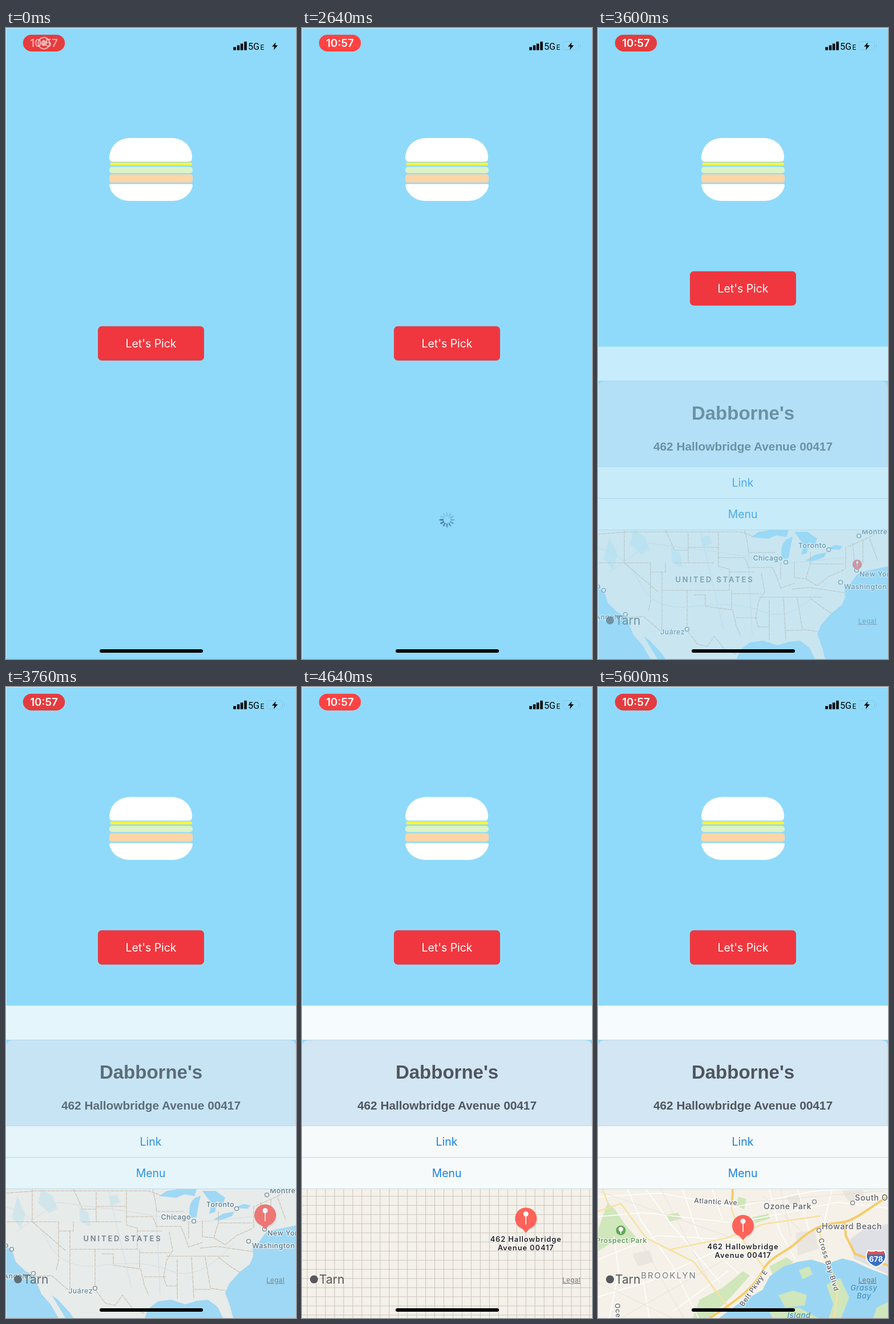
These frames come from a looping animation (508 by 1102 pixels, 5.68 s). An HTML page:

```html
<!DOCTYPE html>
<html lang="en">
<head>
<meta charset="utf-8">
<title>Let's Pick</title>
<style>
html, body { margin: 0; width: 100%; height: 100%; overflow: hidden; background: #8fdafa; }
svg { display: block; width: 100%; height: 100%; font-family: Inter, "Noto Sans", sans-serif; }
.mid { text-anchor: middle; }
.end { text-anchor: end; }
.head { font-family: "Liberation Sans", Arial, sans-serif; font-weight: 700; fill: #50565e; text-anchor: middle; }
.cell { font-family: Roboto, sans-serif; }
.link { fill: #1784df; font-size: 19.4px; text-anchor: middle; }
.label { font-size: 12.3px; font-weight: 500; letter-spacing: .55px; fill: #5d6167; }
.halo { paint-order: stroke; stroke: #fff; stroke-opacity: .8; stroke-width: 2.5px; stroke-linejoin: round; }
.line { fill: none; stroke-linejoin: round; stroke-linecap: round; }
.sea { fill: #a2d7f3; }
.bay { fill: #9ad6f4; }
.park { fill: #d0e6bb; }
</style>
</head>
<body>
<svg viewBox="0 0 508 1102">
  <defs><clipPath id="frame"><path d="M0 877H508V1102H0Z"/></clipPath></defs>
  <path fill="#8fdafa" d="M0 0H508V1102H0Z"/>

  <path fill="#fff" d="M187 233.5Q181 233.5 181 226C182 206 197 192 219 192H289C311 192 326 207 326 226Q326 233.5 320 233.5Z"/>
  <rect x="182.5" y="235" width="143.5" height="5" rx="2.5" fill="#f5f53e"/>
  <rect x="181" y="242.5" width="146" height="11" rx="5" fill="#dcf3c5"/>
  <rect x="181" y="255.5" width="146" height="14.5" rx="4.5" fill="#fdd5a8"/>
  <path fill="#fff" d="M184 272.5H324Q327 272.5 327 275C324 291 309 302 291 302H217C199 302 184 291 181 275Q181 272.5 184 272.5Z"/>

  <g id="button">
    <rect x="161.5" y="521.3" width="185" height="59" rx="6" fill="#f0373f" stroke="#dc3239" stroke-width=".8"/>
    <text class="mid" x="254" y="558" font-size="19.4" fill="#fff">Let's Pick</text>
  </g>
  <g id="spinner" transform="translate(254 859)" stroke="#2f5a80" stroke-width="2.7" stroke-linecap="round"></g>

  <g id="panel">
    <path fill="#f6fcfd" d="M0 556.5H508V616H0Z"/>
    <path fill="#d2e6f3" stroke="#bbd6e6" d="M0 767V629Q0 616.5 13 616.5H495Q508 616.5 508 629V767Z"/>
    <text class="head" x="254" y="684" font-size="33">Dabborne's</text>
    <text class="head" x="254" y="738" font-size="20.8">462 Hallowbridge Avenue 00417</text>
    <path fill="#f7fafa" d="M0 767H508V877H0Z"/>
    <path stroke="#cddde8" stroke-width="1.5" d="M0 821.5H508M0 876.5H508"/>
    <text class="link" x="253.5" y="801">Link</text>
    <text class="link" x="253.5" y="856">Menu</text>

    <g clip-path="url(#frame)">
      <path fill="#f4f1ea" d="M0 877H508V1102H0Z"/>
      <path id="grid" class="line" stroke="#c9c5b9"/>

      <g id="country">
        <path fill="#f9eee7" d="M0 877H508V1102H0Z"/>
        <path fill="#dfe9e8" d="M62 877l20 12 8 22-14 8-20-18zM20 890l14 30-8 26-16-20zM128 908l16 10 4 24-18-8zM180 890l14-4 6 14-16 6z"/>
        <path class="sea" d="M0 975L12 988 17 1004 34 1020 47 1027 55 1043 62 1060 78 1078 92 1102H0ZM80 1062L91 1070 113 1094 118 1102H104L94 1085ZM243 1102L249 1086 266 1073 289 1070 314 1078 334 1072 354 1070 371 1083 380 1102ZM508 940L490 944 470 948 455 953 444 968 432 980 433 994 427 1008 409 1022 391 1042 384 1058 392 1080 398 1102H508Z"/>
        <path class="sea" d="M268 889L282 880 300 877H334L330 889 312 886 298 892ZM322 927Q318 904 330 893L341 888Q336 908 334 926ZM344 880H367L384 892 380 902 369 898 366 917 356 920 360 902ZM364 930L380 920 400 916 396 924 374 932ZM398 910L416 903 428 905 424 911Z"/>
        <path class="line" stroke="#d6b598" stroke-width="1.1" stroke-dasharray="6 2" d="M0 884L52 880H250L272 888M46 877V934L104 984M2 934H92M92 934V1002L88 1018M92 950H118V934M118 877L126 894 134 912H158M158 882V934M134 934H202M158 907H211M112 950V1052M112 982H230M156 982V1048M211 882V940L230 945V982M211 925H257L264 942M230 950H273M168 990H188V1010L234 1016V982M236 988H286M236 1016L242 1044 250 1062M242 1030H281M257 877L262 900 264 916H311M262 942H306L312 956 320 978 344 970M281 994H391M286 952L292 984 281 1002 276 1030 281 1046H300V1068M320 934V962M344 932V960L364 962 372 936M300 1000V1066M325 996L329 1068M349 996L358 1050 384 1054M329 1052H358M372 936V916M374 936H431M364 962L384 974 404 958 431 946M340 980L370 977 431 986M372 996L396 1014 409 1022M434 906V944M446 900L450 942M464 896V936M476 892L490 930M438 906L474 890 492 880M40 1030L80 1028 108 1052H134L156 1052 174 1076 191 1080 204 1062 222 1086 243 1094"/>
        <path class="line" stroke="#dfdfe0" d="M0 908Q50 920 74 970T170 1010 290 1020 400 970M20 950L90 900 210 915 330 935 430 925M180 880L196 950 220 1050M262 900L270 1060"/>
        <text id="nation" class="mid" x="204.5" y="968" font-size="13" font-weight="600" letter-spacing="2.85" fill="#6c7076">UNITED STATES</text>
        <g id="cities"></g>
      </g>

      <g id="town">
        <path fill="#f5f1e8" d="M-300 700H900V1300H-300Z"/>
        <path fill="#e9e6df" d="M330 889l22-3 4 14-20 3zM428 880l36-2 4 16-30 4zM346 953l34-4 6 32-36 12zM60 990l30-6 8 20-28 8z"/>
        <path fill="#dfdfe6" d="M442 964L470 944 508 938V1026L478 1012 448 998Z"/>
        <path class="park" d="M0 948L17 900 30 913 46 937 66 960 54 973 30 966 0 986ZM246 890l14 4-4 18-14-6zM120 922l20-4 6 10-20 6zM178 1070l42-22 34-28 12 8-30 34-40 40h-30zM300 1012l30-16 12 8-34 26zM270 926l28-6 4 8-26 8z"/>
        <path class="bay" d="M212 1102L246 1077 288 1053 301 1029 325 1012 350 1004 374 1000 400 1008 428 998 448 1003 476 1016 508 1028V1130H205Z"/>
        <path class="park" d="M400 1044L424 1032 440 1066 426 1102H404L412 1078ZM316 1062l26-8 24 8-4 18-34 4zM300 1092l52-8 34 18h-80zM488 1084l20-10v28h-26zM352 1018l18-6 6 14-18 8z"/>
        <path class="line" stroke="#fff" stroke-width="1.5" d="M0 890L110 884 240 908 380 880 508 872M52 877L74 930 130 1010 176 1102M0 1000L104 958 250 966M0 1065L90 1038 196 990 254 967M84 877L128 938 214 1040M148 877L176 960 246 1024M200 877L218 930M300 877L318 950 346 1000M350 877L370 950M410 877L396 936M270 930L420 900 508 910M20 1102L36 1020 28 960M90 1102L78 1030M132 1090L228 1020M0 925L80 918 230 935"/>
        <path class="line" stroke="#e2ded5" stroke-width=".8" d="M0 880L230 960M40 1102L240 990M110 877L206 1060M290 890L400 990M320 877L338 960M0 1040L130 1102M70 960L150 1102M260 900L500 880"/>
        <path class="line" stroke="#f8e1a2" stroke-width="2.6" d="M0 916L40 902 84 962 168 1004 232 1088M128 982L226 962 290 938 388 924M236 877L234 912 254 967 291 1014M388 950L400 1000 420 1050 414 1102M17 900L8 877"/>
        <path class="line" stroke="#f6cb68" stroke-width="4" d="M196 1102C230 1080 272 1052 287 1022S324 992 348 970 390 938 420 936 464 916 508 890M432 935L434 958 450 990 508 1010M236 877L235 900"/>
        <g id="places"></g>
        <circle cx="40" cy="949" r="8.5" fill="#61a657"/>
        <path stroke="#fff" stroke-width="1.6" d="M40 948V955"/><circle cx="40" cy="947" r="4" fill="#fff"/>
        <g transform="translate(487 998)">
          <path fill="#376fc4" stroke="#fff" stroke-width="2" d="M-14-14Q-7-11 0-14 7-11 14-14 19-5 16 2 12 11 0 15-12 11-16 2-19-5-14-14Z"/>
          <path fill="#e2504c" d="M-13.5-13Q-7-10 0-13 7-10 13.5-13L16-7H-16Z"/>
          <text class="mid" y="6" font-size="13" font-weight="700" fill="#fff">678</text>
        </g>
      </g>

      <g id="pin">
        <g id="marker">
          <ellipse cx="1" cy="-23" rx="19.5" ry="19.5" fill="#000" opacity=".08"/>
          <path fill="#ff6259" d="M-6-7A19 19 0 1 1 6-7L0 0Z"/>
          <path stroke="#fff" stroke-width="1.6" stroke-linecap="round" d="M0-32V-15"/>
          <circle cy="-33" r="4.5" fill="#fff"/>
        </g>
        <g id="address" class="mid halo" font-size="12.8" font-weight="600" letter-spacing=".95" fill="#202226">
          <text y="15.5">462 Hallowbridge</text><text y="30.5">Avenue 00417</text>
        </g>
      </g>
      <circle cx="21" cy="1034.5" r="7" fill="#55585c"/>
      <text x="30" y="1042" font-size="21" fill="#55585c">Tarn</text>
      <text x="456" y="1040" font-size="11.5" letter-spacing=".5" fill="#707478" text-decoration="underline">Legal</text>
    </g>
  </g>

  <rect id="pill" x="29.7" y="11.7" width="73.5" height="29.2" rx="14.6"/>
  <text id="clock" class="mid" x="66.5" y="33" font-size="18.8" font-weight="600" fill="#fff">10:57</text>
  <g id="record" stroke="#fff" stroke-width="2" fill="none"><circle cx="66.5" cy="26.5" r="10"/><circle cx="66.5" cy="26.5" r="5" fill="#fff" stroke="none"/></g>
  <path d="M398.5 33.5h4v5h-4zM405 30.5h4v8h-4zM411 27.5h4v11h-4zM417.5 24h4v14.5h-4z" stroke="#000" stroke-width=".5" stroke-linejoin="round"/>
  <text class="cell" x="424" y="38" font-size="16">5G</text>
  <text class="cell" x="445.5" y="37.5" font-size="12">E</text>
  <g id="battery" fill="none" stroke="#6fb9d8" stroke-opacity=".6"><rect x="457.5" y="23.5" width="27" height="15" rx="4" stroke-dasharray="2 1"/><path d="M487.5 28.5V34"/></g>
  <path d="M472.5 25L466 32.6H470.3L469 38.5 476 30.2H471.6Z"/>
  <rect x="164" y="1085" width="181" height="6" rx="3"/>
  <path fill="#fff" opacity=".5" d="M0 0H508V1H1V1102H0Z"/>
</svg>
<script>
const $ = id => document.getElementById(id);
const LOOP = 5680, STEP = 80;
const ramp = (t, from, to) => Math.min(1, Math.max(0, (t - from) / (to - from)));
const smooth = x => x * x * (3 - 2 * x);
const mix = (a, b, k) => a + (b - a) * k;
const fade = (id, k) => $(id).setAttribute("opacity", k);
const move = (id, value) => $(id).setAttribute("transform", value);

const dot = (x, y) => `<circle cx="${x}" cy="${y}" r="3.4" fill="#fff" stroke="#777b80" stroke-width="1.4"/>`;
const label = (x, y, text, side = "", style = "") =>
  `<text class="label halo ${side}" x="${x}" y="${y}" style="${style}">${text}</text>`;
const tilted = (x, y, angle, text) =>
  `<g transform="translate(${x} ${y}) rotate(${angle})">${label(0, 0, text, "mid")}</g>`;

$("cities").innerHTML =
  dot(329, 933) + label(324, 930, "Chicago", "end") +
  dot(404, 911) + label(400, 908, "Toronto", "end") +
  dot(457, 887) + label(462, 884, "Montreal") +
  dot(453, 947) + label(458, 958, "New York") +
  dot(425, 968) + label(431, 980, "Washington") +
  dot(48, 1024) + label(47, 1033, "Los Angeles", "end") +
  dot(156, 1050) + label(152, 1059, "Juárez", "end", "font-weight:400") +
  dot(10, 982) + label(5, 979, "San Francisco", "end");

const big = "font-size:14.2px", sea = "font-size:13px;font-style:italic;fill:#4a94c4;stroke:none";
$("places").innerHTML =
  dot(379, 899) + label(374, 912, "Ozone Park", "end", big) +
  dot(446, 901) + label(450, 897, "South Ozone Park", "", big) +
  dot(387, 949) + label(392, 947, "Howard Beach", "", big) +
  label(86, 971, "Prospect Park", "end", "fill:#55904e") +
  label(124, 1033, "BROOKLYN", "mid", "font-size:15px;letter-spacing:1.9px;fill:#85888c") +
  tilted(206, 903, 3, "Atlantic Ave") + tilted(276, 1052, -55, "Belt Pkwy E") +
  tilted(400, 1010, 73, "Cross Bay Blvd") + tilted(33, 1116, 85, "Ocean Pkwy") +
  label(466, 1054, "Grassy", "mid", sea) + label(466, 1068, "Bay", "mid", sea) +
  label(352, 1102, "Island", "mid", sea);

const spokes = Array.from({ length: 12 }, (_, i) =>
  `<path d="M0-7V-12" transform="rotate(${i * 30})"/>`);
$("spinner").innerHTML = spokes.join("");

function gridPath(x, y, cell) {
  let d = "";
  for (let gx = x % cell; gx < 508; gx += cell) d += `M${gx} 877V1102`;
  for (let gy = 877 + (y - 877) % cell; gy < 1102; gy += cell) d += `M0 ${gy}H508`;
  return d;
}

function drawMap(t) {
  const k = smooth(ramp(t, 4200, 5390));
  const x = mix(454, 254, k), y = mix(947.5, 966, k);
  const zoom = 8 * k;
  move("pin", `translate(${x} ${y})`);
  move("marker", `scale(${smooth(ramp(t, 3500, 3720))})`);
  move("country", `translate(${x} ${y}) scale(${2 ** zoom}) translate(-454 -947.5)`);
  move("town", `translate(${x} ${y}) scale(${2 ** (zoom - 8)}) translate(-254 -966)`);
  fade("country", 1 - ramp(t, 4380, 4560));
  fade("cities", 1 - ramp(t, 4220, 4400));
  fade("nation", 1 - ramp(t, 4220, 4400));
  fade("town", ramp(t, 5000, 5240));
  fade("address", ramp(t, 3960, 4160));
  $("grid").setAttribute("d", gridPath(x, y, 15.5 * 2 ** ((zoom + .57) % 1)));
}

function draw(t) {
  const glow = ((1 + Math.cos((t - 640) / 1000 * Math.PI)) / 2) ** 2;
  $("pill").setAttribute("fill", `rgb(${mix(228, 255, glow)},${mix(60, 66, glow)},${mix(62, 66, glow)})`);
  const swap = ramp(t, 0, 320);
  fade("clock", mix(.55, 1, swap));
  fade("record", .55 * (1 - swap));
  fade("battery", t < STEP ? 0 : 1);

  const found = t >= 3280;
  move("button", `translate(0 ${found ? -96 : 0})`);
  fade("panel", ramp(t, 3280, 3860));
  fade("spinner", t >= 640 && !found ? 1 : 0);
  const lead = Math.floor(t * .012 + 1.34);
  [...$("spinner").children].forEach((spoke, i) =>
    spoke.setAttribute("opacity", Math.max(.17, .78 - .075 * ((lead - i + 12) % 12))));
  drawMap(t);
}

const start = performance.now();
function tick() {
  const t = (performance.now() - start) % LOOP;
  draw(Math.floor(t / STEP) * STEP);
  requestAnimationFrame(tick);
}
tick();
</script>
</body>
</html>
```
